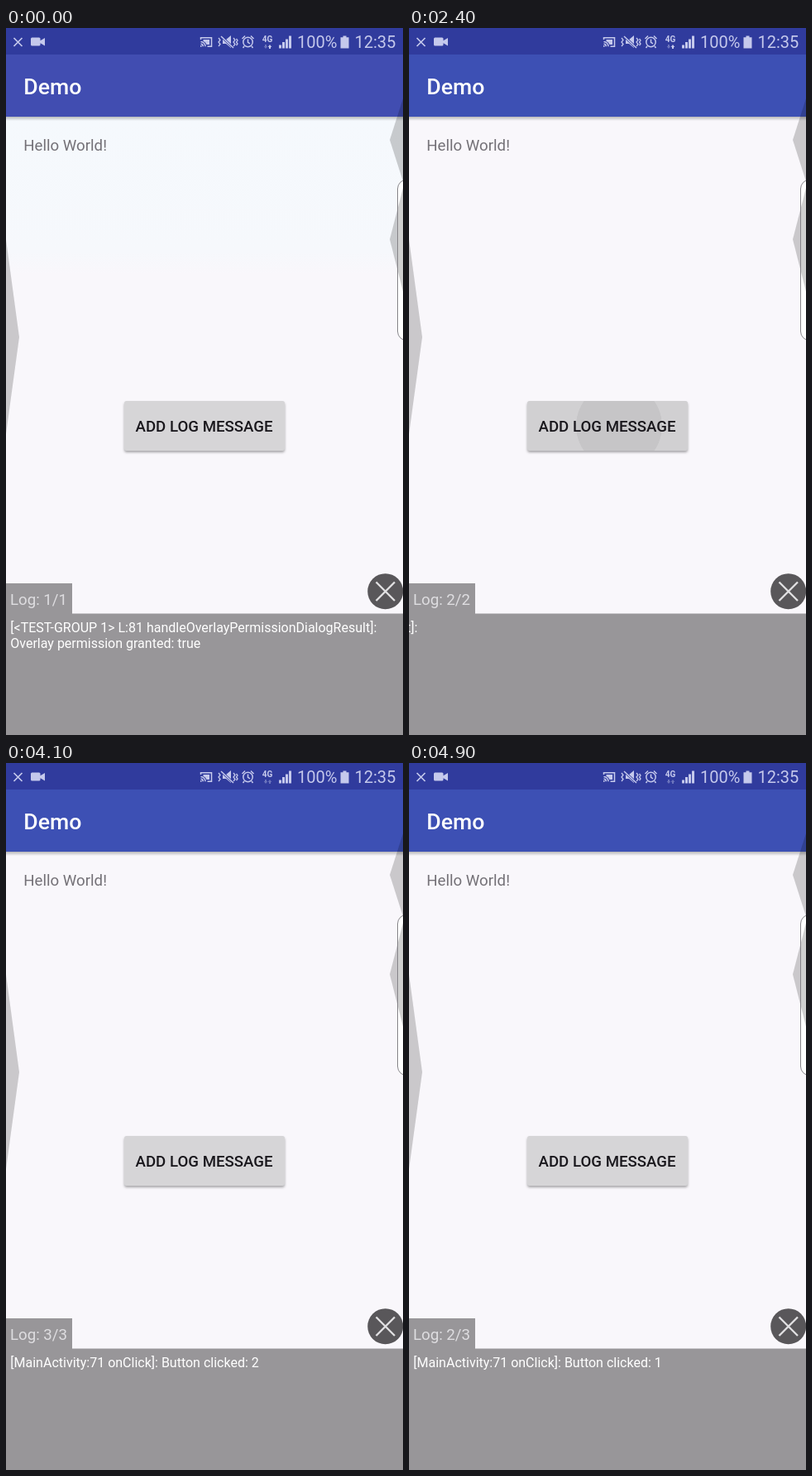
Animation, 480 px wide and 853 px high, one loop 5 s. Source, as an HTML page:

```html
<!DOCTYPE html>
<html lang="en">
<head>
<meta charset="utf-8">
<title>Log overlay demo</title>
<style>
  html, body { margin: 0; width: 100%; height: 100%; overflow: hidden; background: #f9f7fb; }
  svg { display: block; width: 100vw; height: 100vh; }
  text { font-family: Roboto, "Open Sans", sans-serif; white-space: pre; }
  .icons { fill: #c5c9ec; stroke: none; }
  .line { fill: none; stroke: #c5c9ec; }
  .status { font-size: 20px; }
  .medium { font-weight: 500; }
  .log { font-size: 16px; fill: #fff; }
  .count { font-size: 18.67px; fill: #dedde0; }

  .tint, .down, .up, .pager, .second, .third, .labels, .ripple, .press, .dot {
    animation: 5s step-end infinite;
  }
  .tint { animation-name: tint; }
  .down { animation-name: down; }
  .up { animation-name: up; }
  .pager { animation-name: pager; }
  .second { animation-name: second; }
  .third { animation-name: third; }
  .labels { animation-name: labels; }
  .ripple { animation-name: ripple; }
  .press { animation-name: press; }
  .dot { animation-name: dot; }

  @keyframes tint { 0% { opacity: 1 } 8%, 100% { opacity: 0 } }
  @keyframes down { 0% { opacity: .4 } 52% { opacity: 1 } 66%, 100% { opacity: .4 } }
  @keyframes up { 0% { opacity: 1 } 72%, 100% { opacity: .4 } }

  @keyframes pager {
    0% { transform: translateX(0) }
    48% { transform: translateX(-438px) }
    50% { transform: translateX(-480px) }
    66% { transform: translateX(-918px) }
    68% { transform: translateX(-960px) }
    86% { transform: translateX(-925px) }
    88% { transform: translateX(-803px) }
    90% { transform: translateX(-680px) }
    92% { transform: translateX(-527px) }
    94% { transform: translateX(-486px) }
    96%, 100% { transform: translateX(-480px) }
  }
  @keyframes second { 0% { opacity: 0 } 50%, 100% { opacity: 1 } }
  @keyframes third { 0% { opacity: 0 } 68%, 100% { opacity: 1 } }

  @keyframes labels {
    0% { transform: translateY(0) }
    48% { transform: translateY(-40px) }
    66% { transform: translateY(-80px) }
    92%, 100% { transform: translateY(-120px) }
  }

  @keyframes ripple {
    0%, 54%, 72%, 100% { transform: translate(267px, 479px) scale(0); opacity: 0 }
    44%, 62% { transform: translate(265px, 479px) scale(14); opacity: .05 }
    46%, 64% { transform: translate(260px, 480px) scale(32); opacity: .065 }
    48%, 66% { transform: translate(254px, 480px) scale(52); opacity: .06 }
    50%, 68% { transform: translate(248px, 480px) scale(72); opacity: .04 }
    52%, 70% { transform: translate(244px, 480px) scale(86); opacity: .018 }
  }
  @keyframes press {
    0%, 52%, 70%, 100% { opacity: 0 }
    44%, 62% { opacity: .015 }
    46%, 64% { opacity: .02 }
    50%, 68% { opacity: .01 }
  }
  @keyframes dot {
    0% { transform: translate(267px, 479px); opacity: 0 }
    40% { transform: translate(267px, 479px); opacity: 1 }
    46% { transform: translate(267px, 479px); opacity: .4 }
    48% { transform: translate(269px, 477px); opacity: 0 }
    58% { transform: translate(269px, 477px); opacity: 1 }
    64% { transform: translate(269px, 477px); opacity: .4 }
    66% { transform: translate(42px, 790px); opacity: 0 }
    84% { transform: translate(44px, 790px); opacity: 1 }
    86% { transform: translate(88px, 793px); opacity: 1 }
    88% { transform: translate(210px, 796px); opacity: 1 }
    90% { transform: translate(333px, 797px); opacity: .58 }
    92%, 100% { transform: translate(333px, 797px); opacity: 0 }
  }
</style>
</head>
<body>
<svg viewBox="0 0 480 853" preserveAspectRatio="none">
  <defs>
    <linearGradient id="drop" x2="0" y2="1">
      <stop stop-opacity=".26"/>
      <stop offset="1" stop-opacity="0"/>
    </linearGradient>
    <linearGradient id="sky" x2="0" y2="1">
      <stop stop-color="#f5f9fd"/>
      <stop offset=".85" stop-color="#f6f8fc"/>
      <stop offset="1" stop-color="#f9f7fb"/>
    </linearGradient>
    <filter id="soft" x="-10%" y="-20%" width="120%" height="140%">
      <feGaussianBlur stdDeviation="1.5"/>
    </filter>
    <clipPath id="face"><rect x="143" y="450" width="194" height="60" rx="2.7"/></clipPath>
    <clipPath id="tab"><rect y="670" width="80" height="37"/></clipPath>
  </defs>

  <rect width="480" height="853" fill="#f9f7fb"/>
  <rect class="tint" y="107" width="480" height="190" fill="url(#sky)"/>

  <!-- app bar and status bar -->
  <rect y="107" width="480" height="5" fill="url(#drop)"/>
  <rect y="32" width="480" height="75" fill="#3d50b4"/>
  <rect class="tint" y="32" width="480" height="75" fill="#414db1"/>
  <rect width="480" height="32" fill="#303b9d"/>
  <text class="medium" x="21.3" y="80" font-size="26.67" fill="#fff">Demo</text>

  <g class="icons">
    <path class="line" stroke-width="1.7" d="M9.5 12l10 10m0-10l-10 10"/>
    <path d="M31.500 11.500h8.500q1.500 0 1.500 1.500v2.200l5.500-3.200v9.500l-5.500-3.200v1.700q0 1.500-1.500 1.500h-8.500q-1.500 0-1.500-1.500v-7q0-1.500 1.500-1.500z"/>

    <path class="line" stroke-width="1.5" d="M235.500 14v-2.200h13v10.400h-5M235.500 16.500a6 6 0 0 1 5.500 5.700M235.500 19.300a3 3 0 0 1 2.800 2.900"/>
    <path d="M238.500 14h7.500v6h-3.500q-1-3-4-4zM235 21h1.500v1.700h-1.500z"/>

    <path d="M262 14h4l6-5v15l-6-5h-4z"/>
    <path class="line" stroke-width="1.3" d="M257 12l2 2.500-2 2.500 2 2.500-2 2.500M275 12l2 2.500-2 2.500 2 2.500-2 2.500M278.500 13l1.500 2-1.500 2 1.500 2-1.500 2"/>
    <path d="M260 10l15 14" stroke="#303b9d" stroke-width="3"/>
    <path class="line" stroke-width="1.5" d="M260 10l15 14"/>

    <circle class="line" cx="292.500" cy="17" r="5.700" stroke-width="1.500"/>
    <path class="line" stroke-width="1.5" d="M292.500 13.500v3.800l2.500 1.500M285.500 13l3.500-3.500M299.500 13l-3.500-3.500M288 22l-1.500 2M297 22l1.500 2"/>

    <text x="309.700" y="17" font-size="10" font-weight="700">4G</text>
    <path class="down" d="M313 20h2v2h1.300l-2.300 3-2.300-3h1.300z"/>
    <path class="up" d="M318 25h2v-2h1.300l-2.300-3-2.300 3h1.300z"/>

    <path d="M330 20.500h3v4h-3zM334 17h3v7.500h-3zM338 13.500h3v11h-3zM342 9.500h3v15h-3z"/>
    <text class="status" x="352" y="24">100%</text>
    <path d="M407.500 9.500h4v1.700h3v13.300h-10v-13.300h3z"/>
    <text class="status" x="421.500" y="24">12:35</text>
  </g>

  <text x="21.3" y="148" font-size="18.67" fill="#747177">Hello World!</text>

  <!-- screen edge handles -->
  <rect x="473.500" y="183" width="24" height="194" rx="11" fill="#fff"/>
  <g fill-opacity=".19">
    <path d="M0 255L16 373 0 490z"/>
    <path d="M480 85L464 135 480 185z"/>
    <path d="M480 193L464 255 480 318z"/>
  </g>
  <rect x="473.500" y="183" width="24" height="194" rx="11" fill="none" stroke="#858388"/>

  <!-- button -->
  <rect x="143" y="452" width="194" height="60" rx="3" fill-opacity=".33" filter="url(#soft)"/>
  <g clip-path="url(#face)">
    <rect x="143" y="450" width="194" height="60" fill="#d6d5d7"/>
    <rect class="press" x="143" y="450" width="194" height="60"/>
    <circle class="ripple" r="1"/>
  </g>
  <text class="medium" x="156.500" y="487.300" font-size="18.67" fill="#19171c">ADD LOG MESSAGE</text>

  <!-- log overlay -->
  <path d="M0 670h80v36.500h400V853H0z" fill="#989699"/>
  <g clip-path="url(#tab)">
    <g class="labels">
      <text class="count" x="5" y="696">Log: 1/1</text>
      <text class="count" x="5" y="736">Log: 2/2</text>
      <text class="count" x="5" y="776">Log: 3/3</text>
      <text class="count" x="5" y="816">Log: 2/3</text>
    </g>
  </g>
  <g class="pager">
    <text class="log" x="5.300" y="729">[&lt;TEST-GROUP 1&gt; L:81 handleOverlayPermissionDialogResult]:</text>
    <text class="log" x="5.300" y="748">Overlay permission granted: true</text>
    <text class="log second" x="485.300" y="729">[MainActivity:71 onClick]: Button clicked: 1</text>
    <text class="log third" x="965.300" y="729">[MainActivity:71 onClick]: Button clicked: 2</text>
  </g>
  <circle cx="458.700" cy="679.700" r="21.500" fill="#59575a"/>
  <path d="M447.500 668.500l22.500 22.500m0-22.500l-22.500 22.500" stroke="#e2e1e3" stroke-width="2.300"/>

  <!-- touch marker -->
  <g class="dot">
    <circle r="18" fill="#dcdce6" fill-opacity=".16"/>
    <circle r="14.500" fill="#f3f2f7" fill-opacity=".68" stroke="#b2b5dc" stroke-opacity=".85" stroke-width="1.800"/>
  </g>
</svg>
</body>
</html>
```
